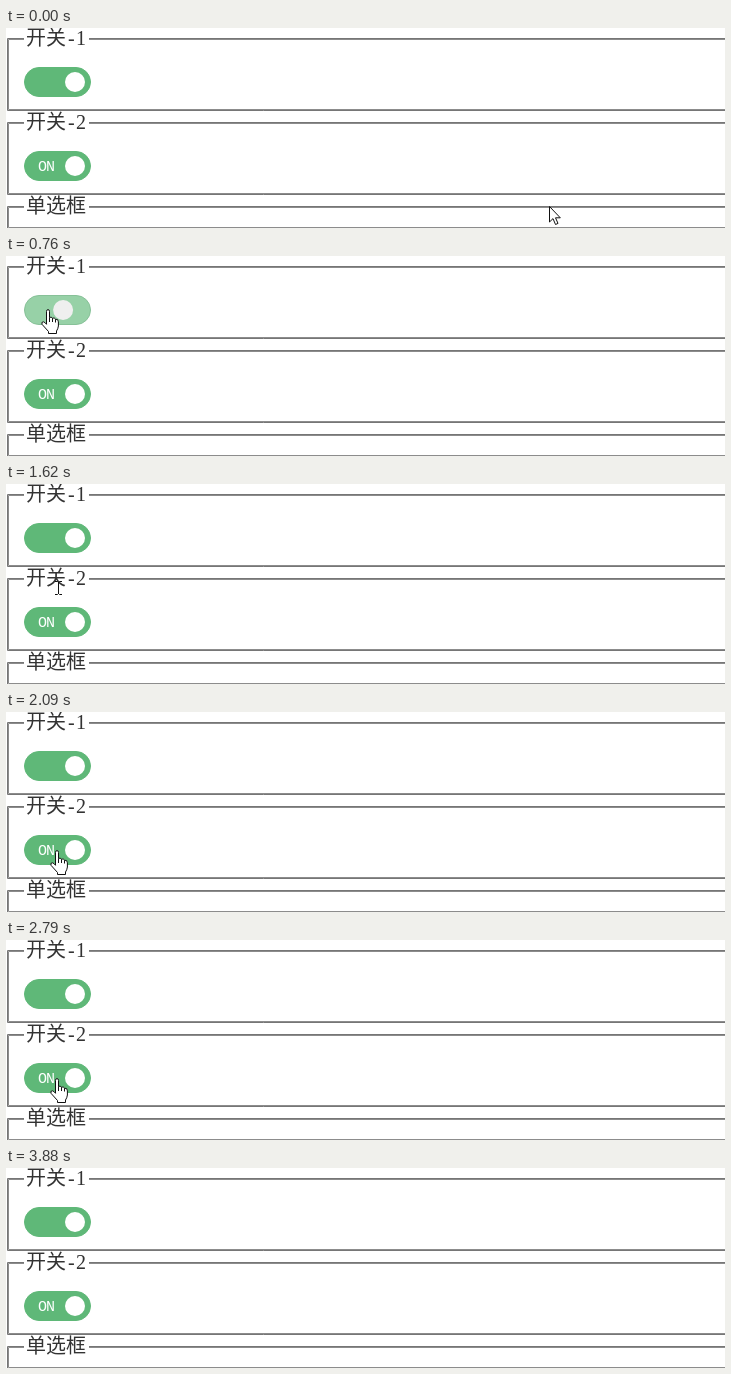
Recreate the animation shown at these times as an HTML page. Size 719 by 200 pixels, loop 4.49 s.

```html
<!DOCTYPE html>
<html lang="zh">
<head>
<meta charset="utf-8">
<title>开关</title>
<style>
  html, body { margin: 0; width: 100%; height: 100%; overflow: hidden; background: #fff; }
  svg { display: block; width: 719px; height: 200px; }
  .legend { font: 300 20px "Noto Sans CJK SC", "Noto Sans CJK", sans-serif; fill: #333; }
  .latin { font: 20px "Liberation Serif", serif; }
  .label { font: 15px "Liberation Mono", monospace; letter-spacing: -1px; }
  .hand, .arrow { fill: #fff; stroke: #111; stroke-linejoin: round; }
  .beam { fill: none; stroke: #111; }
</style>
</head>
<body>
<svg id="stage" viewBox="0 0 719 200">
  <g id="groups"></g>
  <g id="switches"></g>
  <g id="pointer">
    <path class="arrow" d="M.5 .5V16L4 12.6L6.5 18.5L9 17.4L6.5 11.8H11.3Z"/>
    <g class="hand">
      <path d="M5.5 2.5Q5.5 .6 7 .6Q8.5 .6 8.5 2.5V8.6Q10.2 7.3 11.5 9.2Q13.4 8.2 14.5 10.2Q17.4 9.8 17.4 12.8V17Q17 20 15.5 22V24.5H7.5V22.5L1 15.3Q.2 12.8 2.4 12.8Q4 13.2 5.5 15.3Z"/>
      <path fill="none" d="M8.5 8.6V13M11.5 9.2V13M14.5 10.2V13.5"/>
    </g>
    <path class="beam" d="M0 .5H2.5L3.5 1.5L4.5 .5H7M3.5 1V13M0 13.5H2.5L3.5 12.5L4.5 13.5H7"/>
  </g>
</svg>
<script>
const LOOP = 4490;
const GREEN = [95, 184, 120], WHITE = [255, 255, 255], GREY = [210, 210, 210];

const $ = id => document.getElementById(id);

function add(parent, tag, attrs, text = '') {
  const el = document.createElementNS('http://www.w3.org/2000/svg', tag);
  set(el, attrs);
  el.textContent = text;
  parent.append(el);
  return el;
}

function set(el, attrs) {
  for (const k in attrs) el.setAttribute(k, attrs[k]);
}

const mix = (a, b, k) => a + (b - a) * k;
const blend = (a, b, k) => `rgb(${a.map((v, i) => Math.round(mix(v, b[i], k)))})`;

// Grooved box, open on the right, with a gap for the legend
function group(top, bottom, title, digit) {
  const line = (d, stroke) => add($('groups'), 'path', { d, stroke, fill: 'none' });
  const rule = (inset, colour) => {
    const x = 1.5 + inset, y = top + .5 + inset, b = bottom + .5 - inset;
    line(`M18 ${y}H${x}V${b}H719M83 ${y}H719`, colour);
  };
  rule(0, '#767676');
  rule(1, '#8c8c8c');
  const y = top + 7;
  add($('groups'), 'text', { x: 20, y, class: 'legend' }, title);
  if (digit) {
    add($('groups'), 'text', { x: 62, y, class: 'legend latin' }, '-');
    add($('groups'), 'text', { x: 70, y, class: 'legend latin' }, digit);
  }
}

function makeSwitch(y, labelled) {
  const box = $('switches');
  const track = add(box, 'rect', { x: 18.5, y: y + .5, width: 66, height: 29, rx: 14.5 });
  const knob = add(box, 'circle', { cy: y + 15, r: 10 });
  const label = labelled && add(box, 'text', { y: y + 20, class: 'label' });
  return (off, checked) => {
    set(track, { fill: blend(GREEN, WHITE, off), stroke: blend(GREEN, GREY, off) });
    set(knob, { cx: mix(69, 35, off), fill: blend(WHITE, GREY, off) });
    if (!label) return;
    set(label, { x: checked ? 32 : 50, fill: checked ? '#fff' : '#999' });
    label.textContent = checked ? 'ON' : 'OFF';
  };
}

group(10, 82, '开关', '1');
group(94, 166, '开关', '2');
group(178, 200, '单选框');

const switches = [
  { draw: makeSwitch(39, false), clicks: [760, 1310] },
  { draw: makeSwitch(123, true), clicks: [2170, 2560, 3100, 3480] }
];

// Eased 300 ms transition as the recorder sampled it: [delay, progress]
const EASE = [[0, .35], [75, .8], [150, .97], [230, 1]];

// time, shape, x, y
const MOVES = [
  [0, 'arrow', 543, 178], [70, 'arrow', 500, 150], [150, 'arrow', 390, 96],
  [230, 'arrow', 262, 48], [300, 'arrow', 150, 20], [380, 'arrow', 78, 13],
  [460, 'hand', 34, 43], [530, 'hand', 35, 51], [610, 'hand', 35, 53],
  [1620, 'beam', 49, 97], [1710, 'arrow', 44, 114], [1780, 'hand', 32, 127],
  [1860, 'hand', 32, 133], [2090, 'hand', 44, 138], [2870, 'hand', 47, 138],
  [2950, 'hand', 50, 137], [3710, 'arrow', 150, 121], [3790, 'arrow', 518, 176],
  [3880, 'none', 0, 0]
];

const latest = (rows, t) => rows.filter(r => r[0] <= t).pop();

function draw(t) {
  for (const { draw, clicks } of switches) {
    const past = clicks.filter(c => c <= t);
    const checked = past.length % 2 === 0;
    const done = past.length ? latest(EASE, t - past.pop())[1] : 1;
    draw(checked ? 1 - done : done, checked);
  }
  const [, shape, x, y] = latest(MOVES, t);
  set($('pointer'), { transform: `translate(${x} ${y})` });
  for (const el of $('pointer').children)
    el.style.display = el.classList.contains(shape) ? '' : 'none';
}

const start = performance.now();
function tick() {
  draw((performance.now() - start) % LOOP);
  requestAnimationFrame(tick);
}
tick();
</script>
</body>
</html>
```
